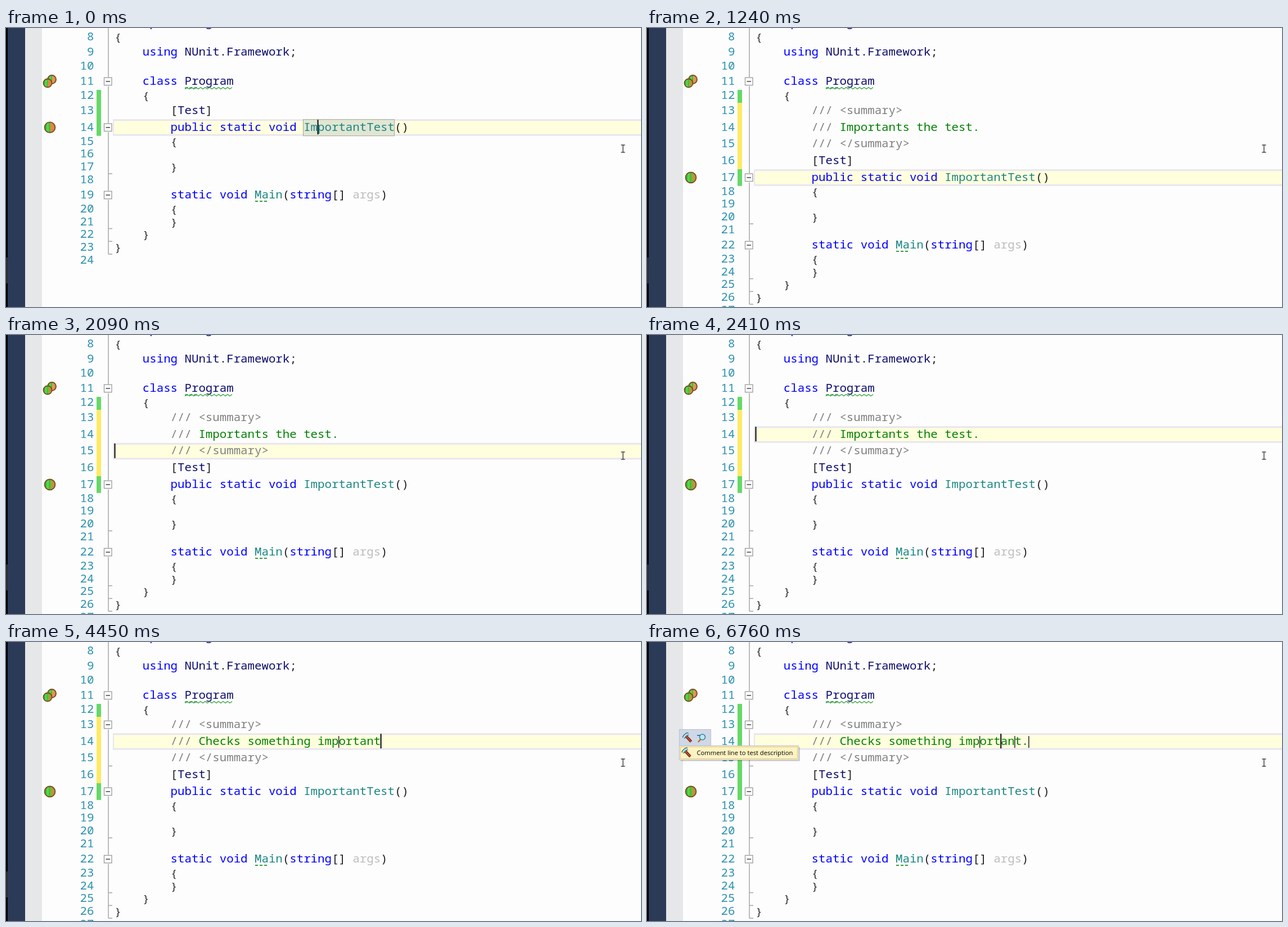
Animation of 1129x496 px, one loop 8 s. Source, as an HTML page with a canvas:

```html
<!DOCTYPE html>
<html lang="en">
<head>
<meta charset="utf-8">
<title>Code editor</title>
<style>
html, body { margin: 0; width: 100%; height: 100%; overflow: hidden; background: #fdfdfd; }
canvas { display: block; }
</style>
</head>
<body>
<canvas id="stage" width="1129" height="496"></canvas>
<script>
const ctx = document.getElementById('stage').getContext('2d');
const LOOP = 8000, LEFT = 193, CHAR = 12.45;
const MONO = '"Noto Sans Mono", monospace';
const INK = { k: '#0000ff', n: '#0c0c6e', b: '#1e1e1e', t: '#1a8585', g: '#808080', c: '#008000', x: '#bdbdbd' };

// Each token starts with its colour letter; tokens are split by "|".
const HEAD = ['b{', 'k    using |nNUnit|b.|nFramework|b;', '', 'k    class |nProgram', 'b    {'];
const SUMMARY = ['g        /// <summary>', '', 'g        /// </summary>'];
const TAIL = ['b        [|nTest|b]', 'k        public static void |tImportantTest|b()', 'b        {', '', 'b        }', '',
  'k        static void |tMain|b(|kstring|b[] |xargs|b)', 'b        {', 'b        }', 'b    }', 'b}', ''];

const FIRST = 'Importants the test.', NEXT = 'Checks something important.';
const typed = n => ({ text: NEXT.slice(0, n), col: 12 + n });

// Changes add up over time: the state is the sum of all that have passed.
const EVENTS = [
  [0, { row: 14, col: 29, box: true, ghosts: [], text: FIRST, edge: true }],
  [230, { col: null }],
  [780, { col: 29 }],
  [1240, { doc: true, row: 17, col: null, box: false }],
  [1480, { col: 29, box: true }],
  [1800, { col: 0, box: false }],
  [1940, { row: 16 }],
  [2090, { row: 15 }],
  [2250, { row: 14 }],
  [2730, { col: 12 }],
  [2880, { fold: true, hammer: true }],
  [3430, { col: null, ghosts: [12] }],
  [3490, { col: 32, ghosts: [] }],
  [3700, { ...typed(6), hammer: false, ghosts: [32] }],
  [3900, typed(11)],
  [4100, typed(16)],
  [4270, typed(20)],
  [4450, typed(26)],
  [4820, typed(27)],
  [5200, { saved: true }],
  [5500, { col: null }],
  [5760, { col: 39 }],
  [5930, { col: 38, ghosts: [32, 39] }],
  [6020, { col: 37 }],
  [6110, { col: 36, ghosts: [32, 37, 39] }],
  [6200, { col: 35 }],
  [6300, { hammer: true }],
  [6620, { hammer: false, menu: true, edge: false }],
  [6760, { tip: true }]
];
const stateAt = t => Object.assign({}, ...EVENTS.filter(e => e[0] <= t).map(e => e[1]));
const colX = col => LEFT + col * CHAR;

function rect(x, y, w, h, fill) {
  ctx.fillStyle = fill;
  ctx.fillRect(x, y, w, h);
}

function line(points, color, width = 1) {
  ctx.beginPath();
  points.forEach(p => ctx.lineTo(...p));
  ctx.strokeStyle = color;
  ctx.lineWidth = width;
  ctx.stroke();
}

function disc(x, y, r, fill, stroke, width) {
  ctx.beginPath();
  ctx.arc(x, y, r, 0, 7);
  ctx.fillStyle = fill;
  ctx.fill();
  ctx.strokeStyle = stroke;
  ctx.lineWidth = width;
  ctx.stroke();
}

function write(text, x, y, color, font) {
  ctx.font = font;
  ctx.fillStyle = color;
  ctx.fillText(text, x, y);
}

// Lines without letters are squeezed to a smaller height.
function layout(s) {
  const source = [...HEAD, ...(s.doc ? SUMMARY : []), ...TAIL];
  if (s.doc) source[6] = 'g        /// |c' + s.text;
  let y = 15, before = true;
  return source.map((code, i) => {
    const small = !/\w/.test(code.slice(1));
    if (i) y += small ? (before ? 22.7 : 24.8) : (before ? 27.3 : 29.7);
    before = small;
    return { code, small, y, num: i + 8 };
  });
}

function drawCode({ code, small, y, num }) {
  const font = '20.75px ' + MONO;
  const base = Math.round(y + 6.6);
  ctx.textAlign = 'right';
  write(num, 156.5, base, '#2b91af', font);
  ctx.textAlign = 'left';
  if (small) {
    const brace = code.slice(1);
    write(brace.trim(), colX(brace.search(/\S/)) + .7, base + 1, INK.b, '18px ' + MONO);
    return;
  }
  let col = 0;
  for (const token of code.split('|')) {
    write(token.slice(1), colX(col), base, INK[token[0]], font);
    col += token.length - 1;
  }
}

function ball(x, y, r, right) {
  const g = ctx.createLinearGradient(x - r, 0, x + r, 0);
  g.addColorStop(0, '#1fa52c');
  g.addColorStop(.3, '#5fdc50');
  g.addColorStop(.5, '#35b834');
  g.addColorStop(.56, right);
  g.addColorStop(1, '#d8843c');
  disc(x, y, r, g, '#7a4a20', 1.8);
}

function hammer(x, y, scale) {
  ctx.save();
  ctx.translate(x, y);
  ctx.scale(scale, scale);
  const handle = [[11, 11], [25, 26]], head = [[2.5, 15], [6, 9], [11, 4.5], [17, 3]];
  line(handle, '#3a1408', 7.5);
  line(handle, '#d04a28', 4.5);
  line(head, '#1c2830', 8.5);
  line(head, '#a4e6f4', 5.5);
  ctx.restore();
}

function foldBox(y) {
  rect(174, y - 7, 15, 16, '#fdfdfd');
  ctx.strokeStyle = '#9a9a9a';
  ctx.lineWidth = 1.3;
  ctx.strokeRect(174.5, y - 6.2, 13.5, 13.5);
  line([[177.5, y + .6], [185, y + .6]], '#444', 1.5);
}

function margins(rows, s) {
  const yOf = n => rows[n - 8].y;
  const method = s.doc ? 17 : 14;
  rect(161, 110, 8, yOf(method) + 15.5 - 110, '#65d967');
  if (s.doc && !s.saved) rect(161, 133, 8, 118, '#fdea62');

  const tick = y => line([[182, y], [189, y]], '#a5a5a5', 1.5);
  const ends = rows.filter(r => r.code.endsWith('}')).map(r => r.y + 12.7);
  line([[182, 0], [182, ends[ends.length - 1]]], '#a5a5a5', 1.5);
  ends.forEach(tick);
  rows.filter(r => /class|static/.test(r.code)).forEach(r => foldBox(r.y));
  if (s.fold) {
    foldBox(yOf(13));
    tick(yOf(15) + 14.5);
  }

  const right = s.doc ? '#8fae38' : '#e08a45';
  ball(81.5, 91.5, 7.5, '#e0a060');
  ball(74, 98, 7.5, right);
  ball(78, yOf(method) + .6, 9.4, right);
}

function underlines(rows, s) {
  const wave = [];
  for (let x = 318; x <= 405; x += 4) wave.push([x, x % 8 === 6 ? 108.5 : 105.5]);
  line(wave, '#2f9e3a', 1.2);
  const y = rows[s.doc ? 14 : 11].y + 11.5;
  ctx.setLineDash([5, 3]);
  line([[318, 106.5], [340, 106.5]], '#2f9e3a', 2);
  line([[443, y], [465, y]], '#2f9e3a', 2);
  ctx.setLineDash([]);
}

function currentLine(y, s) {
  rect(190, y - 14, 939, 29.5, '#e8e6ef');
  rect(192, y - 11, 937, 23.5, '#ffffde');
  if (!s.box) return;
  rect(528, y - 14, 163, 30, '#a3a59a');
  rect(529, y - 13, 161, 28, '#e1e6d3');
}

function menu(s) {
  rect(57, 155, 57, 31, '#b9c1d3');
  rect(58, 156, 55, 29, '#d0d7e6');
  hammer(63.5, 161.5, .6);
  line([[96, 172], [91, 178]], '#b96a35', 2.5);
  line([[89, 166], [94, 166]], '#3f7f96', 2);
  disc(98.5, 169, 5, '#b5ebf2', '#3f7f96', 1.6);
  if (!s.tip) return;
  rect(60, 187, 212, 25, 'rgba(0,0,0,.16)');
  rect(57, 184, 213, 26, '#b5b9c6');
  rect(58, 185, 211, 24, '#fdfbee');
  rect(59, 186, 209, 22, '#e5c365');
  rect(60, 187, 207, 20, '#fdf3c2');
  hammer(62, 188, .6);
  write('Comment line to test description', 88.5, 201, '#000', '11.2px "Open Sans", sans-serif');
}

function draw(t) {
  const s = stateAt(t), rows = layout(s), y = rows[s.row - 8].y;
  rect(0, 0, 1129, 496, '#fdfdfd');
  rect(0, 0, 3, 496, '#000');
  if (s.edge) rect(0, 408, 3, 46, '#2d2d31');
  rect(3, 0, 31, 496, '#2b3a56');
  rect(34, 0, 30, 496, '#e6e7e8');

  currentLine(y, s);
  margins(rows, s);
  write('namespace', LEFT, -3, INK.k, '20.75px ' + MONO);
  write('Program', colX(10), -3, INK.n, '20.75px ' + MONO);
  rows.forEach(drawCode);
  underlines(rows, s);

  s.ghosts.forEach(col => rect(colX(col) - .5, y - 9, 1.5, 21, s.col === null ? '#777' : '#222'));
  if (s.col !== null) rect(colX(s.col) - .5, y - 13, 2, 26, '#000');
  if (s.hammer) hammer(64, y - 14, 1);
  if (s.menu) menu(s);

  line([[1097, 208], [1097, 221]], '#444', 1.5);
  for (const end of [208, 221]) line([[1093.5, end], [1100.5, end]], '#444', 1.5);
}

function frame() {
  draw(performance.now() % LOOP);
  requestAnimationFrame(frame);
}
frame();
</script>
</body>
</html>
```
